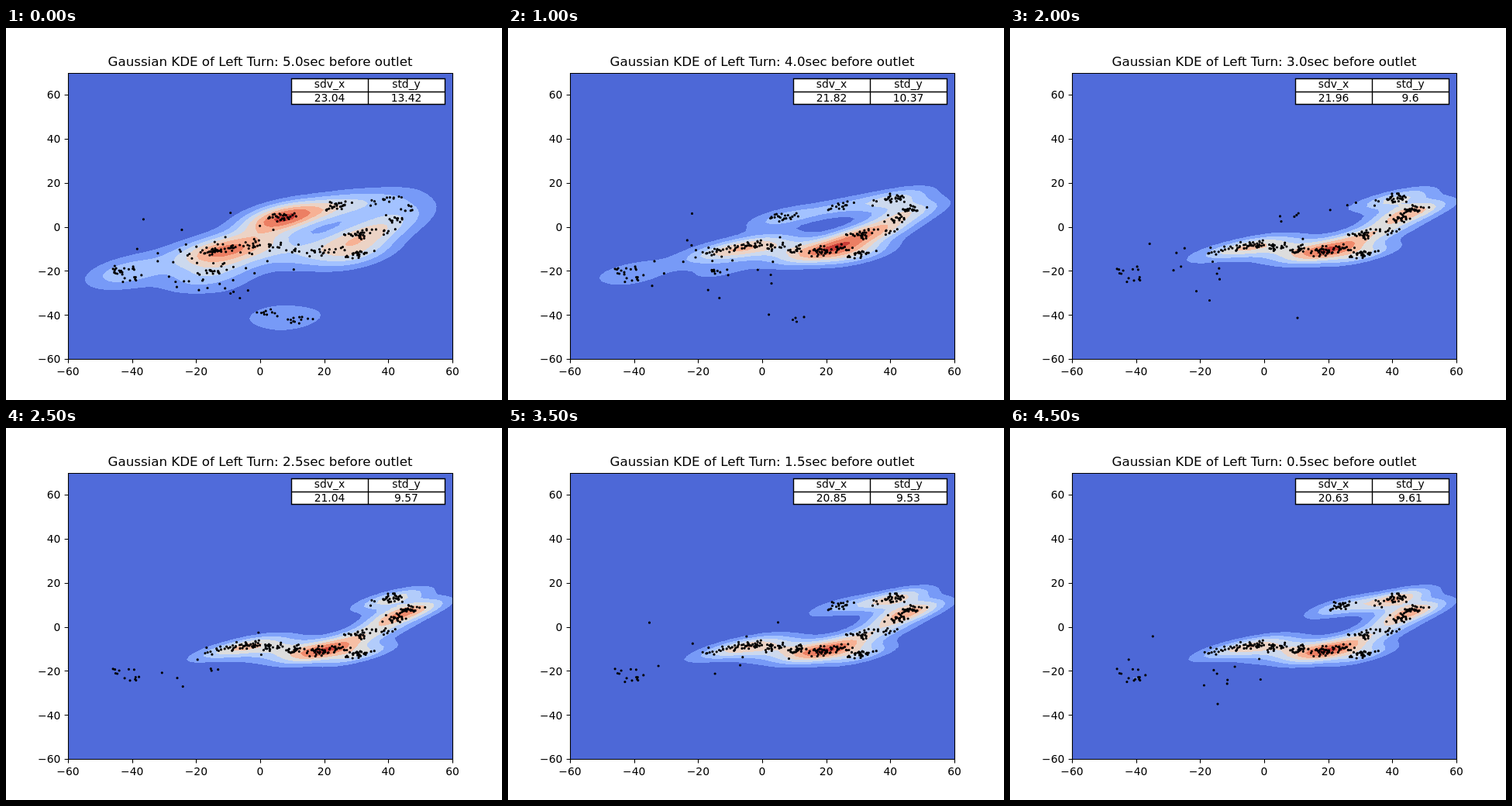
These frames come from a looping animation (640 by 480 pixels, 5000 ms). An HTML page with a canvas:

```html
<!DOCTYPE html>
<html lang="en">
<head>
<meta charset="utf-8">
<title>Gaussian KDE</title>
<style>
html, body { margin: 0; width: 100%; height: 100%; overflow: hidden; background: #fff; }
canvas { position: absolute; left: 80px; top: 58px; }
svg { position: absolute; left: 0; top: 0; font: 13.89px "DejaVu Sans", sans-serif; }
</style>
</head>
<body>
<canvas id="field" width="496" height="370"></canvas>
<svg width="640" height="480" viewBox="0 0 640 480">
  <path id="dots" fill="none" stroke="#000" stroke-width="3.2" stroke-linecap="round"/>
  <g id="axes"></g>
  <g text-anchor="middle">
    <path d="M368.5 65.5H566.5V98.5H368.5ZM368.5 82.5H566.5M467.5 65.5V98.5" fill="#fff" stroke="#000" stroke-width="1.39"/>
    <text x="417.5" y="77">sdv_x</text>
    <text x="516.5" y="77">std_y</text>
    <text id="sx" x="417.5" y="95"></text>
    <text id="sy" x="516.5" y="95"></text>
    <text id="title" x="328" y="49" font-size="16.67"></text>
  </g>
</svg>
<script>
const el = id => document.getElementById(id);
const SCALE_X = 496 / 120, SCALE_Y = 369.6 / 130;
const px = x => 328 + x * SCALE_X;
const py = y => 256.6 - y * SCALE_Y;

const palettes = {
  7: ['506bda', '80a3fa', 'b2ccfb', 'dddddd', 'f6bfa5', 'f08a6c', 'ce433a'],
  8: ['4d68d7', '779af7', 'a3c2ff', 'ccd9ee', 'ecd3c5', 'f7b194', 'ec7f63', 'cb3e38']
};
const bands = '8787778888';
const sdvX = '23.04 22.74 21.82 23.1 21.96 21.04 20.94 20.85 20.74 20.63'.split(' ');
const stdY = '13.42 11.96 10.37 9.64 9.6 9.57 9.55 9.53 9.57 9.61'.split(' ');

// Places where vehicles gather: x, y, then how many at each key time.
const keyTimes = [0, 0.5, 2.5, 4.5];
const sites = [
  [-44, -19.5, 20, 16, 7, 5], [-39.5, -23, 8, 10, 5, 9],
  [-14.5, -11, 32, 22, 10, 14], [-8.5, -9, 5, 9, 14, 14], [-3, -8, 12, 18, 24, 26],
  [3.5, -9, 10, 14, 22, 26], [10, -10.5, 8, 12, 24, 28], [18.5, -11, 12, 30, 42, 44],
  [24, -10, 8, 20, 24, 28], [31, -12, 24, 18, 32, 28], [31, -3.5, 28, 50, 24, 22],
  [39, -1.5, 8, 8, 12, 12], [42, 4, 12, 14, 28, 26], [46.5, 8, 8, 10, 42, 42],
  [42, 13.5, 6, 20, 34, 42], [36.5, 11, 9, 6, 6, 12], [24.5, 9.5, 26, 24, 0, 32],
  [7, 4.5, 64, 36, 0, 0], [-15.5, -20, 14, 7, 0, 2],
  [12, -42, 12, 6, 0, 0], [2, -39, 10, 2, 0, 0]
];

function random(seed) {
  return () => (seed = seed * 16807 % 2147483647) / 2147483647;
}

function bell(seed) {
  const rnd = random(seed);
  for (let i = 0; i < 5; i++) rnd();
  return () => (rnd() + rnd() + rnd() - 1.5) * 2;
}

function countAt(counts, t) {
  const i = t < keyTimes[1] ? 0 : t < keyTimes[2] ? 1 : 2;
  const u = (t - keyTimes[i]) / (keyTimes[i + 1] - keyTimes[i]);
  return counts[i] + (counts[i + 1] - counts[i]) * (1 - (1 - u) ** 1.5);
}

function vehicles(t) {
  const out = [];
  sites.forEach(([x, y, ...counts], i) => {
    const rnd = bell(7919 * (i + 3));
    const spots = Array.from({ length: 28 }, () => {
      const dx = rnd() * 2;
      return [x + dx, y + dx * 0.15 + rnd()];
    });
    const n = Math.round(countAt(counts, t));
    for (let k = 0; k < n; k++) out.push(spots[k % spots.length]);
  });
  const rnd = bell(4242 + Math.round(t * 977));
  const strays = 8 + 50 * Math.exp(-t / 0.9);
  for (let k = 0; k < strays; k++) out.push([-14 + rnd() * 11, -15 + rnd() * 9]);
  return out;
}

// Kernel with the shape of the data's covariance, narrowed by Scott's rule.
function kernel(pts, sx, sy) {
  const n = pts.length;
  const mean = f => pts.reduce((sum, p) => sum + f(p), 0) / n;
  const mx = mean(p => p[0]), my = mean(p => p[1]);
  const rho = mean(p => (p[0] - mx) * (p[1] - my)) /
    Math.sqrt(mean(p => (p[0] - mx) ** 2) * mean(p => (p[1] - my) ** 2));
  const scott = n ** (-1 / 6), hx = sx * scott, hy = sy * scott, k = -0.5 / (1 - rho * rho);
  return (dx, dy) => {
    const a = dx / hx, b = dy / hy;
    return Math.exp(k * (a * a - 2 * rho * a * b + b * b));
  };
}

const CELL = 4, COLS = 126, ROWS = 95;

function drawField(pts, kern, n) {
  const grid = new Float32Array(COLS * ROWS);
  let peak = 0;
  for (let j = 0, i = 0; j < ROWS; j++) {
    for (let c = 0; c < COLS; c++, i++) {
      const x = -60 + c * CELL / SCALE_X, y = 70 - j * CELL / SCALE_Y;
      for (const p of pts) grid[i] += kern(x - p[0], y - p[1]);
      peak = Math.max(peak, grid[i]);
    }
  }
  const colors = palettes[n].map(h => [0, 2, 4].map(k => parseInt(h.slice(k, k + 2), 16)));
  const canvas = el('field'), ctx = canvas.getContext('2d');
  const img = ctx.createImageData(canvas.width, canvas.height);
  const mix = (a, b, u) => a + (b - a) * u;
  for (let y = 0, o = 0; y < img.height; y++) {
    for (let x = 0; x < img.width; x++, o += 4) {
      const c = Math.floor(x / CELL), r = Math.floor(y / CELL), i = r * COLS + c;
      const u = x / CELL - c, v = y / CELL - r;
      const z = mix(mix(grid[i], grid[i + 1], u), mix(grid[i + COLS], grid[i + COLS + 1], u), v);
      img.data.set(colors[Math.min(n - 1, Math.floor(z / peak * (n - 0.6)))], o);
      img.data[o + 3] = 255;
    }
  }
  ctx.putImageData(img, 0, 0);
}

function draw(step) {
  const pts = vehicles(step / 2);
  drawField(pts, kernel(pts, +sdvX[step], +stdY[step]), +bands[step]);
  el('dots').setAttribute('d',
    pts.map(([x, y]) => `M${px(x).toFixed(1)} ${py(y).toFixed(1)}h.01`).join(''));
  el('title').textContent = `Gaussian KDE of Left Turn: ${(5 - step / 2).toFixed(1)}sec before outlet`;
  el('sx').textContent = sdvX[step];
  el('sy').textContent = stdY[step];
}

function drawAxes() {
  const snap = v => Math.round(v) + 0.5;
  const label = v => String(v).replace('-', '\u2212');
  let d = 'M80.5 58.5H576.5V427.5H80.5Z', text = '';
  for (let v = -60; v <= 60; v += 20) {
    d += `M${snap(px(v))} 427.5v4.9M80.5 ${snap(py(v))}h-4.9`;
    text += `<text x="${px(v)}" y="448" text-anchor="middle">${label(v)}</text>` +
      `<text x="70.3" y="${Math.round(py(v) + 5.2)}" text-anchor="end">${label(v)}</text>`;
  }
  el('axes').innerHTML = `<path d="${d}" fill="none" stroke="#000" stroke-width="1.11"/>${text}`;
}

let shown = -1, start;
function tick(now) {
  start ??= now;
  const step = Math.floor((now - start) / 500) % 10;
  if (step !== shown) draw(shown = step);
  requestAnimationFrame(tick);
}

drawAxes();
draw(shown = 0);
requestAnimationFrame(tick);
</script>
</body>
</html>
```
